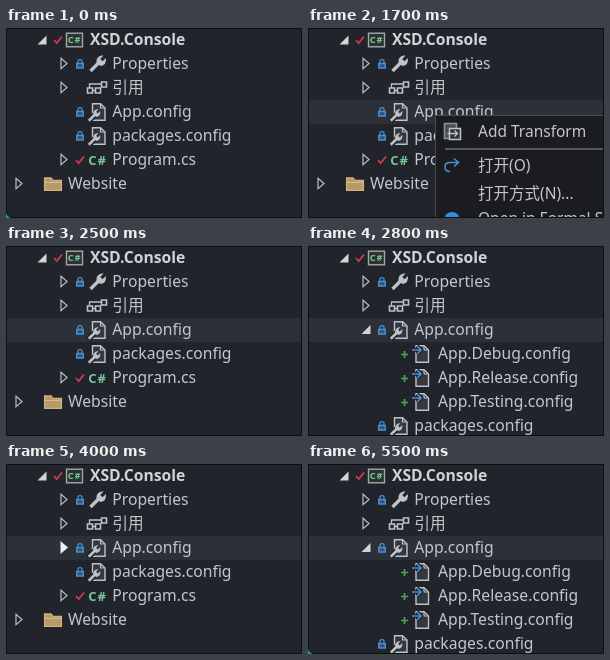
Animation, 296 px wide and 190 px high, one loop 5600 ms. Source, as an HTML page:

```html
<!DOCTYPE html>
<html lang="en">
<head>
<meta charset="utf-8">
<title>Solution tree</title>
<style>
  html, body { margin: 0; width: 100%; height: 100%; overflow: hidden; background: #21242b; }
  svg { display: block; width: 296px; height: 190px; }
  text { font: 15.7px "Noto Sans", "Noto Sans CJK SC", "Noto Sans CJK", sans-serif; fill: #c3c6cb; white-space: pre; }
  .bold { font-weight: 700; fill: #d0d3d8; }
  .menu { font-size: 15.5px; }
  .sharp { font: 700 13px "Noto Sans", sans-serif; fill: #7ac795; letter-spacing: 1px; }
</style>
</head>
<body>
<svg id="stage" viewBox="0 0 296 190"></svg>
<script>
const LOOP = 5600, ROW = 24;
const BG = '#21242b', SELECTED = '#2c3039', LIGHT = '#bfc2c7', BLUE = '#4a90d0', GREEN = '#4aa556', RED = '#d03a4c';
const rowY = i => 12 + ROW * i;

const rect = (x, y, w, h, fill, extra = '') =>
  `<rect x="${x}" y="${y}" width="${w}" height="${h}" fill="${fill}" ${extra}/>`;
const fill = (d, color) => `<path d="${d}" fill="${color}"/>`;
const line = (d, color, width = 1.2, inside = 'none') =>
  `<path d="${d}" fill="${inside}" stroke="${color}" stroke-width="${width}"/>`;
const label = (x, y, s, cls = '') => `<text x="${x}" y="${y + 5}" class="${cls}">${s}</text>`;
const at = (x, y, s) => `<g transform="translate(${x} ${y})">${s}</g>`;
const scaled = (k, s) => `<g transform="scale(${k})">${s}</g>`;

// Icons are drawn around their own centre.
const closed = hover => hover
  ? fill('M-3.5-6.5L4 0L-3.5 6.5Z', '#eceef0')
  : line('M-3-5.2L3 0L-3 5.2Z', '#b9bcc2', 1.2);
const opened = hover => fill('M4.5-4.5V4.5H-4.5Z', '#d2d4d8') + (hover ? fill('M3-1.5V2.5H-1Z', SELECTED) : '');
const lock = line('M-2-1V-2.8Q-2-4.4 0-4.4T2-2.8V-1', BLUE, 1.3) + line('M-3.2-.6H3.2V4H-3.2Z', BLUE, 1.5, '#2b5580');
const tick = line('M-4 0L-1.3 3L4-3.5', RED, 1.8);
const plus = line('M-3.5 0H3.5M0-3.5V3.5', GREEN, 1.7);
const wrench = line('M-7 7L2-2', LIGHT, 3.4) +
  fill('M-1-1Q-2-7 4-8.5L6-8.4L2.8-5L5-2.8L8.4-6Q9.3 1 3 2Z', LIGHT);
const references = line('M-10 0H-5V5H-10ZM-2 0H3V5H-2ZM4-6H9V-1H4Z', LIGHT, 1.6) +
  line('M-5 2.5H-2M-8 0V-4H4', LIGHT, 1.3);
const page = line('M-5-8.3H3L7.5-4V8.3H-5Z', LIGHT, 1.4, '#33373f') + line('M3-8V-4H7', LIGHT, 1.2);
const config = page + at(-3.5, 3.5, scaled(.75, line('M-8 8L4-4', BG, 8) + wrench));
const arrowIn = 'M-9-4H-1M-4-8L0-4L-4 0';
const transform = page + line(arrowIn, BG, 4) + line(arrowIn, BLUE, 1.7);
const sharp = '<text class="sharp" text-anchor="middle" y="4.5">C#</text>';
const project = rect(-8, -6.8, 16, 13.6, '#2a3331', 'stroke="#a3a7ab" stroke-width="1.4"') + scaled(.72, sharp);
const folder = line('M-8.4-6H-2L0-3.6H8.4V6.4H-8.4Z', '#cdb283', 1.3, '#b99a66') + line('M-8-1.6H8', '#d8c093', 1);

function item(i, name, icon, { arrow = '', badge = '' } = {}) {
  const y = rowY(i);
  return at(58, y - .5, arrow) + at(74, y, badge) + at(91.5, y, icon) + label(106.3, y, name);
}

function tree(s) {
  let out = s.selected ? rect(0, 72, 296, ROW, SELECTED) : '';
  out += at(36, 12, opened()) + at(52, 12, tick) + at(68.5, 12, project) + label(84, 12, 'XSD.Console', 'bold');
  out += item(1, 'Properties', wrench, { arrow: closed(), badge: lock });
  out += item(2, '引用', references, { arrow: closed() });
  const arrow = s.expanded ? opened(s.hover) : s.hover ? closed(true) : '';
  out += item(3, 'App.config', config, { arrow, badge: lock });

  let next = 4;
  if (s.expanded) for (const kind of ['Debug', 'Release', 'Testing']) {
    const y = rowY(next++);
    out += (s.added ? at(96.5, y + .5, plus) : '') + at(113, y, transform) + label(130, y, `App.${kind}.config`);
  }
  out += item(next, 'packages.config', config, { badge: lock });
  out += item(next + 1, 'Program.cs', sharp, { arrow: closed(), badge: tick });
  const y = rowY(next + 2);
  return out + at(13, y - .5, closed()) + at(47, y, folder) + label(62, y, 'Website');
}

function menu(hot) {
  const copy = line('M-8-8H4V7H-8Z', '#8f9298', 1.6, '#4b4e54') + line('M-3-3H8V8H-3Z', LIGHT, 1.5, '#33353a') +
    line('M-5 2H5M2-1L5 2L2 5', LIGHT, 1.3);
  const redo = line('M6-2H-2Q-7-2-7 2.5T-2 7M2-6L6.5-2L2 2', BLUE, 1.5);
  return rect(127.5, 87.5, 180, 110, '#1b1c1f', 'stroke="#4a4c50"') +
    (hot ? rect(130, 90, 166, 27, '#2b2c31') : '') +
    rect(137, 120.5, 159, 1, '#8e9095') +
    at(144.5, 103.5, copy) + label(170, 104, 'Add Transform', 'menu') +
    at(144, 136.5, redo) + label(170, 138, '打开(O)', 'menu') +
    label(170, 166, '打开方式(N)...', 'menu') +
    `<circle cx="144" cy="192" r="8" fill="#2f8fd6"/>` + label(170, 191, 'Open in Formal Stage', 'menu');
}

function draw(s) {
  stage.innerHTML = rect(0, 0, 296, 190, BG) + tree(s) +
    (s.menu ? menu(s.hot) : '') +
    rect(.5, .5, 295, 189, 'none', 'stroke="#0e0f12"') +
    (s.corner ? fill('M0 185Q1 189 5 190H0Z', '#2a9d8f') : '');
}

const stage = document.getElementById('stage');
let last = '';
function update() {
  const t = performance.now() % LOOP;
  const within = (a, b = LOOP) => t >= a && t < b;
  const state = {
    selected: within(1600),
    menu: within(1700, 2500),
    hot: within(2000, 2500),
    expanded: within(2600, 4000) || within(4500),
    added: within(2800),
    hover: within(3900, 5000),
    corner: within(0, 1600) || within(5500)
  };
  const key = JSON.stringify(state);
  if (key !== last) draw(state);
  last = key;
  requestAnimationFrame(update);
}
update();
</script>
</body>
</html>
```
